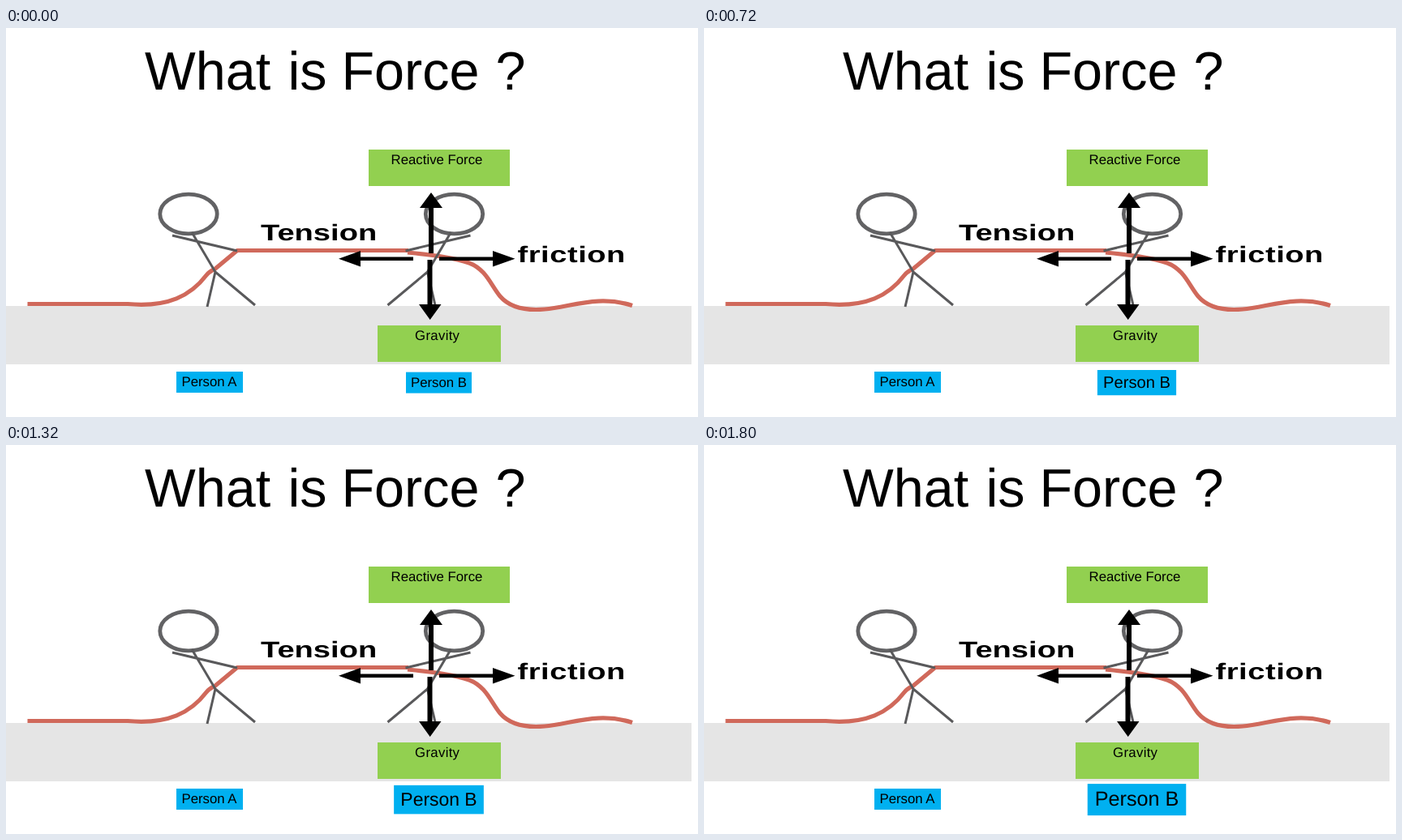
Recreate the animation shown at these times as an HTML page. Size 853x480 px, loop 1860 ms.

```html
<!DOCTYPE html>
<html lang="en">
<head>
<meta charset="utf-8">
<title>What is Force ?</title>
<style>
  html, body { margin: 0; width: 100%; height: 100%; overflow: hidden; background: #fff; }
  svg { display: block; width: 853px; height: 480px; }
  text { font-family: "Liberation Sans", Arial, sans-serif; text-rendering: geometricPrecision; }
  .title { font-size: 66.5px; }
  .label { font-size: 16.8px; text-anchor: middle; }
  .wide { font-size: 28px; font-weight: bold; }
  .rope { fill: none; stroke: #d0695b; stroke-width: 5.2; stroke-linejoin: round; }
  .limbs { fill: none; stroke: #59595b; stroke-width: 3; }
  .head { fill: none; stroke: #626264; stroke-width: 4.8; }
  .green { fill: #92d050; }
  .blue { fill: #00b0f0; }
</style>
</head>
<body>
<svg viewBox="0 0 853 480">
  <defs>
    <g id="person">
      <ellipse class="head" cx="225" cy="229.5" rx="35.2" ry="24.4"/>
      <path class="limbs" d="M229 252L258 301M205 256L285 275M248 344L258 301L307 342"/>
    </g>
  </defs>

  <g class="title">
    <text x="171" y="76">What</text>
    <text x="347.5" y="76">is</text>
    <text x="413.5" y="76">Force</text>
    <text x="603.5" y="76">?</text>
  </g>

  <rect y="343" width="845" height="72" fill="#e5e5e5"/>

  <path class="rope" d="M26.5 340.5H150C200 345 228 330 247 305Q250 301 258 297L285 274.5H496"/>
  <path class="rope" d="M495 277C522 280 552 283 571 290C592 298 598 318 609 331C621 345 641 349 664 347C697 344 730 329 772 342.5"/>

  <use href="#person"/>
  <use href="#person" transform="translate(777.5) scale(-1 1)"/>

  <!-- the diagram is drawn wider than tall -->
  <text class="wide" transform="translate(314 262) scale(1.36 1)">Tension</text>
  <text class="wide" transform="translate(630.5 289) scale(1.36 1)" letter-spacing=".4">friction</text>

  <path d="M521 278V222H510L524 203L538 222H527V278Z"/>
  <path d="M519.5 286V341H509L522.7 360L536.5 341H525.5V286Z"/>
  <path d="M502 282.6H437V275L410 284.8L437 294.5V287H502Z"/>
  <path d="M534 282.6H600V275L627.5 284.8L600 294.5V287H534Z"/>

  <rect class="green" x="447" y="150" width="174" height="45"/>
  <text class="label" x="531" y="168">Reactive Force</text>
  <rect class="green" x="458" y="367" width="152" height="45"/>
  <text class="label" x="531.7" y="385" letter-spacing=".3">Gravity</text>

  <rect class="blue" x="210" y="424" width="82" height="26"/>
  <text class="label" x="250.5" y="442">Person A</text>

  <g id="growing">
    <rect class="blue" x="-40.5" y="-13" width="81" height="26"/>
    <text class="label" y="5.2">Person B</text>
  </g>
</svg>
<script>
  const LOOP = 1860, STEP = 60, LAST = LOOP / STEP - 1;
  const tag = document.getElementById("growing");

  function draw() {
    const step = Math.floor(performance.now() % LOOP / STEP);
    const size = 1 + 0.5 * step / LAST;
    tag.setAttribute("transform", `translate(533.5 437.6) scale(${size})`);
    requestAnimationFrame(draw);
  }
  draw();
</script>
</body>
</html>
```
